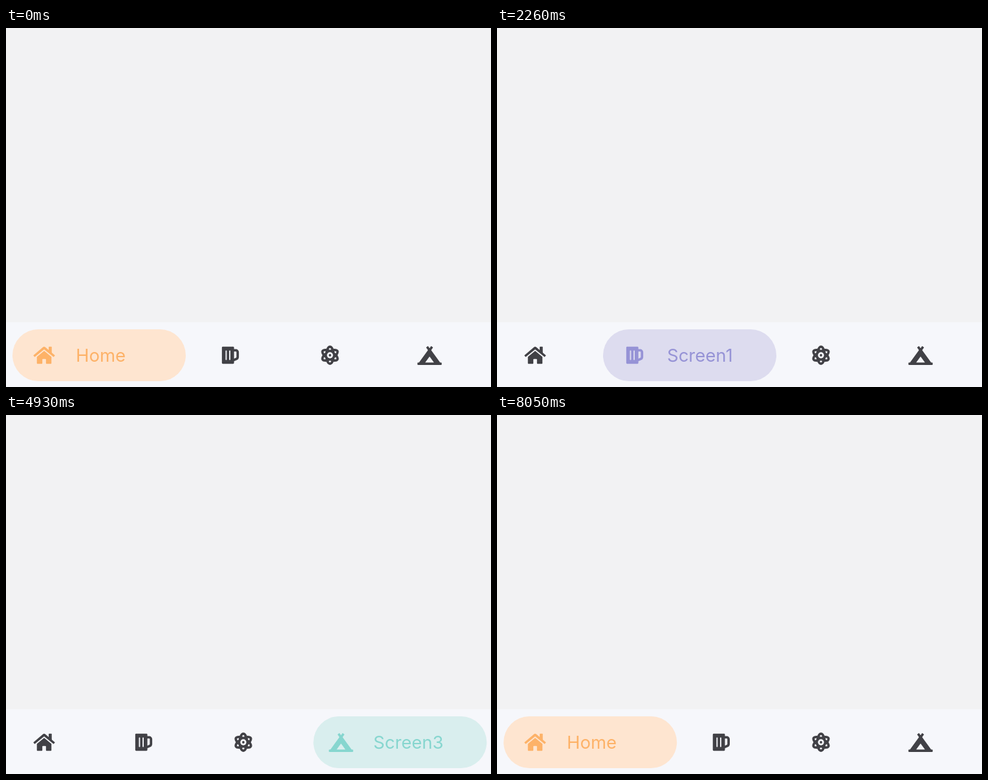
An HTML page that plays this animation: 750x554 px, repeating every 8080 ms.

```html
<!DOCTYPE html>
<html lang="en">
<head>
<meta charset="utf-8">
<title>Animated tab bar</title>
<style>
  html, body { margin: 0; width: 100%; height: 100%; overflow: hidden; background: #f2f2f3; }
  svg { display: block; width: 100vw; height: 100vh; }
  text { font: 400 27.5px Inter, Roboto, sans-serif; }
</style>
</head>
<body>
<svg id="stage" viewBox="0 0 750 554">
  <rect width="750" height="554" fill="#f2f2f3"/>
  <rect y="454" width="750" height="100" fill="#f6f7fb"/>
  <rect id="pill" y="465" width="268" height="80" rx="40"/>
</svg>
<script>
const LOOP = 8080;
const SLOT = 154;      // width of an idle tab
const EXTRA = 134;     // added width of the active tab
const DARK = "rgb(65,65,70)";

// Icons are drawn on a 512-unit-high grid around their own centre.
const spin = (shape, angles) => angles.map(a => `<g transform="rotate(${a})">${shape}</g>`).join("");

const icons = {
  home: `<g transform="translate(-288 -256)">
    <path d="M2 260L257 43a48 48 0 0 1 61 0L574 260L538 304L288 101L38 304Z"/>
    <path d="M408 150V44a12 12 0 0 1 12-12h56a12 12 0 0 1 12 12v160z"/>
    <path d="M96 300L288 142L480 300V464a16 16 0 0 1-16 16H352a16 16 0 0 1-16-16V368
      a16 16 0 0 0-16-16h-64a16 16 0 0 0-16 16V464a16 16 0 0 1-16 16H112a16 16 0 0 1-16-16z"/></g>`,
  mug: `<path transform="translate(-224 -256)" fill-rule="evenodd" d="M24 32H296a24 24 0 0 1 24 24V96h48
    a80 80 0 0 1 80 80V305a80 80 0 0 1-47 73L320 414V456a24 24 0 0 1-24 24H24a24 24 0 0 1-24-24V56a24 24 0 0 1 24-24z
    M320 160V344L375 319a16 16 0 0 0 9-14V176a16 16 0 0 0-16-16z
    M96 144V368a16 16 0 0 0 32 0V144a16 16 0 0 0-32 0z
    M192 144V368a16 16 0 0 0 32 0V144a16 16 0 0 0-32 0z"/>`,
  atom: `<mask id="gaps"><path fill="#fff" d="M-260-260H260V260H-260z"/><g fill="#000"><circle r="80"/>
      ${spin('<path d="M0-192Q16-192 34-155L0-142L-34-155Q-16-192 0-192z"/>', [0, 60, 120, 180, 240, 300])}</g></mask>
    <g mask="url(#gaps)">${spin('<ellipse rx="131" ry="256"/>', [0, 60, 120])}</g><circle r="32"/>`,
  tent: `<g transform="translate(-320 -256)">
    <path d="M253 33L320 125M387 33L320 125" stroke="currentColor" stroke-width="62" stroke-linejoin="round"/>
    <path fill-rule="evenodd" d="M41 448L280 118H360L599 448H624a16 16 0 0 1 16 16v32a16 16 0 0 1-16 16H16
      a16 16 0 0 1-16-16v-32a16 16 0 0 1 16-16zM320 288L204 448H436z"/></g>`
};

const tabs = [
  { icon: "home", label: "Home", tint: [253, 178, 104], fill: [254, 229, 208] },
  { icon: "mug", label: "Screen1", tint: [150, 147, 214], fill: [221, 220, 239] },
  { icon: "atom", label: "Screen2", tint: [238, 140, 158], fill: [249, 216, 222] },
  { icon: "tent", label: "Screen3", tint: [134, 214, 207], fill: [217, 238, 238] }
];

// Each tap: time and the tab it opens.
const taps = [[1400, 1], [2880, 2], [4550, 3], [6170, 1], [7400, 0]];

const stage = document.getElementById("stage");
const pill = document.getElementById("pill");
const rgb = color => `rgb(${color.map(Math.round)})`;
const mix = (a, b, p) => a + (b - a) * p;
const mixColor = (a, b, p) => a.map((v, i) => mix(v, b[i], p));
const clamp = v => Math.min(1, Math.max(0, v));

function add(name, content) {
  const node = document.createElementNS("http://www.w3.org/2000/svg", name);
  node.innerHTML = content;
  stage.append(node);
  return node;
}

for (const tab of tabs) {
  tab.iconNode = add("g", icons[tab.icon]);
  tab.iconNode.setAttribute("fill", "currentColor");
  tab.labelNode = add("text", tab.label);
  tab.labelNode.setAttribute("y", 514.5);
  tab.labelNode.setAttribute("fill", rgb(tab.tint));
}

// Slightly underdamped spring from 0 to 1.
function spring(ms) {
  const t = ms / 1000, decay = 11, freq = 10.45;
  if (t > 0.8) return 1;
  return 1 - Math.exp(-decay * t) * (Math.cos(freq * t) + decay / freq * Math.sin(freq * t));
}

const tabLeft = (index, active) => index * SLOT + (index > active ? EXTRA : 0);

function draw(time) {
  let from = 0, to = 0, start = -LOOP;
  for (const [at, index] of taps) {
    if (time >= at) [from, to, start] = [to, index, at];
  }
  const p = spring(time - start), shown = clamp(p);

  pill.setAttribute("x", mix(from, to, p) * SLOT + 10);
  pill.setAttribute("fill", rgb(mixColor(tabs[from].fill, tabs[to].fill, shown)));

  tabs.forEach((tab, i) => {
    const left = mix(tabLeft(i, from), tabLeft(i, to), p);
    const active = i === to;
    tab.iconNode.setAttribute("transform", `translate(${left + 59} 505) scale(.0586)`);
    tab.iconNode.setAttribute("color", active ? rgb(tab.tint) : DARK);
    tab.iconNode.setAttribute("opacity", active ? mix(0.7, 1, shown) : 1);
    tab.labelNode.setAttribute("x", left + (i ? 109 : 108));
    tab.labelNode.setAttribute("opacity", active ? shown : 0);
  });
}

const began = performance.now();
function tick() {
  draw((performance.now() - began) % LOOP);
  requestAnimationFrame(tick);
}
tick();
</script>
</body>
</html>
```
